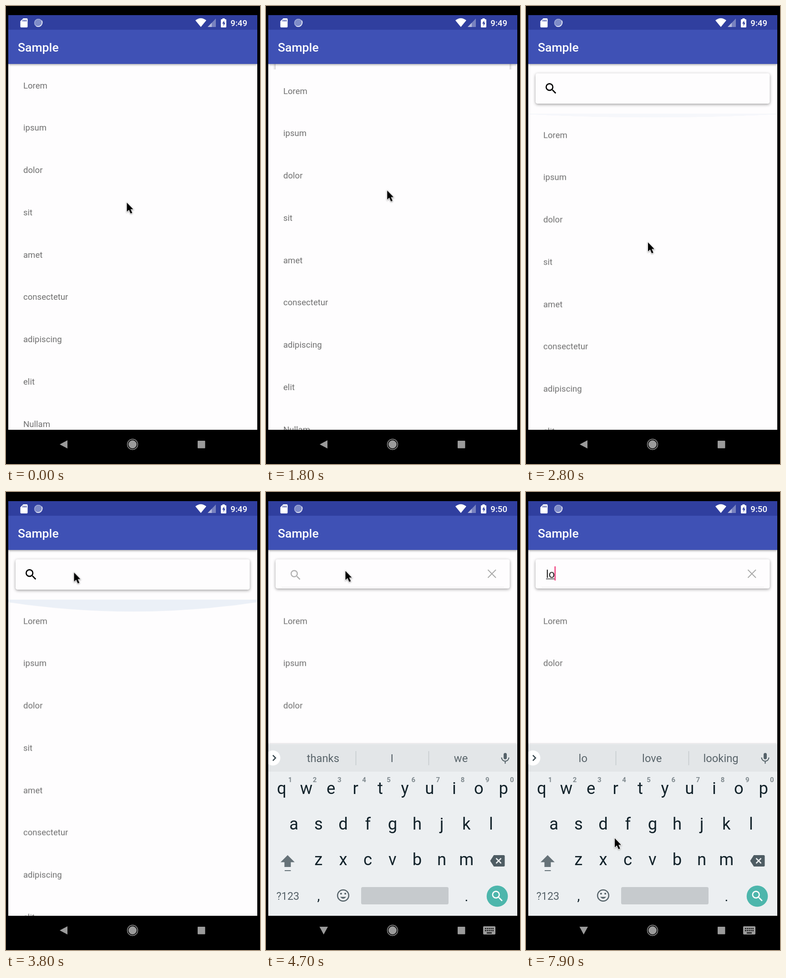
Write an HTML page that moves like this. It is 558x1004 px and loops after 8000 ms.

```html
<!DOCTYPE html>
<html lang="en">
<head>
<meta charset="utf-8">
<title>Pull-down search</title>
<style>
html, body { margin: 0; width: 100%; height: 100%; overflow: hidden; background: #000; }
svg { display: block; width: 100vw; height: 100vh; font-family: Roboto, sans-serif; }
.item { font-size: 18.6px; fill: #707070; }
.suggestion { font-size: 23.8px; fill: #59646a; text-anchor: middle; }
.key { font-size: 36.5px; fill: #13232b; text-anchor: middle; }
.digit { font-size: 15px; font-weight: 700; fill: #7f898e; text-anchor: middle; }
.typed { font-size: 23.8px; fill: #212121; }
.clock { font-size: 18.6px; font-weight: 500; fill: #fff; text-anchor: end; }
.card { fill: #fefdfe; filter: drop-shadow(0 2px 3px rgba(0, 0, 0, .38)); }
.bar { filter: drop-shadow(0 2px 2px rgba(0, 0, 0, .32)); }

/* Hard switches */
.pre-focus, .focused, .old-time, .new-time, .nav-idle, .nav-typing,
.empty, .filtered, .one, .two, .caret { animation: 8s step-end infinite; }
.pre-focus { animation-name: until-focus; }
.focused { animation-name: from-focus; }
.old-time { animation-name: until-minute; }
.new-time { animation-name: from-minute; }
.nav-idle { animation-name: until-keyboard; }
.nav-typing { animation-name: from-keyboard; }
.empty { animation-name: until-l; }
.filtered { animation-name: from-l; }
.one { animation-name: only-l; }
.two { animation-name: from-lo; }
.caret { animation-name: caret; }
@keyframes until-focus { 0% { opacity: 1 } 50%, 100% { opacity: 0 } }
@keyframes from-focus { 0% { opacity: 0 } 50%, 100% { opacity: 1 } }
@keyframes until-minute { 0% { opacity: 1 } 55%, 100% { opacity: 0 } }
@keyframes from-minute { 0% { opacity: 0 } 55%, 100% { opacity: 1 } }
@keyframes until-keyboard { 0% { opacity: 1 } 51.25%, 100% { opacity: 0 } }
@keyframes from-keyboard { 0% { opacity: 0 } 51.25%, 100% { opacity: 1 } }
@keyframes until-l { 0% { opacity: 1 } 65%, 100% { opacity: 0 } }
@keyframes from-l { 0% { opacity: 0 } 65%, 100% { opacity: 1 } }
@keyframes only-l { 0% { opacity: 0 } 65% { opacity: 1 } 68.75%, 100% { opacity: 0 } }
@keyframes from-lo { 0% { opacity: 0 } 68.75%, 100% { opacity: 1 } }
@keyframes caret {
  0% { opacity: 0; transform: none }
  51.25% { opacity: 1; transform: none }
  57.5% { opacity: 0; transform: none }
  63.75% { opacity: 1; transform: none }
  65% { opacity: 1; transform: translateX(6px) }
  68.75% { opacity: 1; transform: translateX(19.3px) }
  75% { opacity: 0; transform: translateX(19.3px) }
  81.25% { opacity: 1; transform: translateX(19.3px) }
  87.5% { opacity: 0; transform: translateX(19.3px) }
  93.75%, 100% { opacity: 1; transform: translateX(19.3px) }
}

/* Motion */
.panel { animation: pull 8s linear infinite; }
.search { animation: parallax 8s linear infinite; }
.glow { animation: glow 8s linear infinite; transform-origin: 278px 127px; }
.keyboard { animation: rise 8s linear infinite; }
.pointer { animation: point 8s ease-in-out infinite; }
.pointer path { animation: hide 8s step-end infinite; filter: drop-shadow(0 1px 1.5px rgba(0, 0, 0, .4)); }
@keyframes pull {
  0%, 21.25% { transform: none }
  27.5% { transform: translateY(59.7px) }
  32.5%, 100% { transform: translateY(108.5px) }
}
@keyframes parallax {
  0%, 21.25% { transform: translateY(-74.2px) }
  27.5% { transform: translateY(-33.5px) }
  32.5%, 100% { transform: none }
}
@keyframes glow {
  0%, 33% { opacity: 0; transform: scaleY(0) }
  40% { opacity: .6; transform: scaleY(1.15) }
  47.5% { opacity: .4; transform: none }
  51%, 100% { opacity: 0; transform: scaleY(.8) }
}
@keyframes rise {
  0%, 51.25% { transform: translateY(390px); animation-timing-function: ease-out }
  54%, 100% { transform: none }
}
@keyframes point {
  0%, 2.5% { transform: translate(265.5px, 431px) }
  12.5%, 15% { transform: translate(271.5px, 481px) }
  21.25% { transform: translate(266px, 392px); animation-timing-function: linear }
  27.5% { transform: translate(267px, 453.5px); animation-timing-function: linear }
  32.5% { transform: translate(268px, 502px); animation-timing-function: ease-out }
  40% { transform: translate(268px, 535px) }
  47.5%, 51% { transform: translate(149.5px, 176.5px) }
  56%, 92.5% { transform: translate(174.5px, 173px) }
  98%, 100% { transform: translate(195px, 759px) }
}
@keyframes hide { 0% { opacity: 1 } 65% { opacity: 0 } 92.5%, 100% { opacity: 1 } }
</style>
</head>
<body>
<svg viewBox="0 0 558 1004" preserveAspectRatio="none">
  <defs>
    <path id="lens" d="M15.5 14h-.79l-.28-.27A6.47 6.47 0 0 0 16 9.5 6.5 6.5 0 1 0 9.5 16c1.61 0 3.09-.59 4.23-1.57l.27.28v.79l5 4.99L20.49 19l-4.99-5zm-6 0a4.5 4.5 0 1 1 0-9 4.5 4.5 0 0 1 0 9z"/>
    <clipPath id="screen"><rect x="5" y="20" width="547" height="909"/></clipPath>
  </defs>
  <rect width="558" height="1004"/>

  <g clip-path="url(#screen)">
    <rect x="5" y="120" width="547" height="809" fill="#fefdfe"/>

    <g class="search">
      <g class="pre-focus">
        <rect class="card" x="21" y="147.5" width="514.5" height="66.5" rx="4.5"/>
        <use href="#lens" transform="translate(39 165) scale(1.33)"/>
      </g>
      <g class="focused">
        <rect class="card" x="21" y="147.5" width="514.5" height="64" rx="4.5"/>
        <path d="M34 208.5H523" stroke="#ececec"/>
        <path d="M487.5 170.5l17.5 17.5m0-17.5l-17.5 17.5" stroke="#a9a9a9" stroke-width="2"/>
        <use class="empty" href="#lens" transform="translate(50.3 167.3) scale(1.23)" fill="#b2b2b2"/>
      </g>
      <g class="one"><text class="typed" x="44" y="188">l</text><path d="M44 190.5h6" stroke="#333" stroke-width="1.5"/></g>
      <g class="two"><text class="typed" x="44" y="188">lo</text><path d="M44 190.5h19" stroke="#333" stroke-width="1.5"/></g>
      <rect class="caret" x="43.3" y="163" width="2.6" height="31" fill="#f0407f"/>
    </g>

    <g class="panel">
      <rect x="5" y="127" width="547" height="930" fill="#fefdfe"/>
      <path class="glow" d="M5 127H552V133Q278 174 5 133Z" fill="#cfdcec"/>
      <g id="all" class="empty"></g>
      <g id="matches" class="filtered"></g>
      <text class="item one" x="38" y="366">elit</text>
    </g>

    <g class="bar">
      <rect x="5" y="20" width="547" height="107" fill="#3f51b5"/>
      <rect x="5" y="20" width="547" height="32" fill="#303f9f"/>
    </g>
    <text x="26" y="100" font-size="26.6" font-weight="500" fill="#fff">Sample</text>

    <g fill="#fff">
      <path d="M38 27h7.500q2 0 2 2v16q0 2-2 2h-12q-2 0-2-2V33.500z"/>
      <path d="M37.500 30v4m3.300-4v4m3.300-4v4" stroke="#303f9f" stroke-width="1.600"/>
      <circle cx="71" cy="37" r="8.300" fill="#7e8bc8" stroke="#d5daf0" stroke-width="1.600" stroke-dasharray="1.500 1"/>
      <path d="M78.500 32a9 9 0 0 1-12 12" fill="none" stroke="#e4e7f5" stroke-width="1.800"/>
      <path d="M416 31.500Q428 22 440 31.500L428 46z"/>
      <path d="M443 46L461 27.500V46z" opacity=".35"/>
      <path d="M443 46L452 36.800V46z" opacity=".45"/>
      <path d="M475.500 29v-2h5v2h2q1.500 0 1.500 1.500v15q0 1.500-1.500 1.500h-9q-1.500 0-1.500-1.500v-15q0-1.500 1.500-1.500z"/>
      <path d="M479.500 31.500l-4.500 7h2.800v5.500l4-7.500h-2.600z" fill="#303f9f"/>
    </g>
    <text class="clock old-time" x="530" y="43.600">9:49</text>
    <text class="clock new-time" x="530" y="43.600">9:50</text>

    <g class="keyboard">
      <rect x="5" y="552" width="547" height="377" fill="#eceff1" style="filter:drop-shadow(0 -1px 1px rgba(0,0,0,.14))"/>
      <rect x="5" y="553" width="547" height="60" fill="#e3e6e8"/>
      <circle cx="15" cy="583" r="16.500" fill="#fff"/>
      <path d="M15 577l6 6-6 6" fill="none" stroke="#3a484f" stroke-width="2.500"/>
      <path d="M197.500 568v31m160-31v31" stroke="#c4c9cc" stroke-width="1.500"/>
      <g id="suggestions"></g>
      <g fill="none" stroke="#56636a" stroke-width="2.200">
        <rect x="522" y="572" width="7" height="14" rx="3.500" fill="#56636a" stroke="none"/>
        <path d="M517.500 582a8 8 0 0 0 16 0M525.500 590v5.500"/>
        <circle cx="169.500" cy="884.500" r="12.300" stroke-width="2.500"/>
        <path d="M163 887.500q6.500 8 13 0z" fill="#56636a" stroke="none"/>
      </g>
      <path d="M164.800 880.500h.1m9.200 0h.1" stroke="#56636a" stroke-width="4" stroke-linecap="round"/>
      <g id="keys"></g>
      <path d="M47.500 796L63 811.500h-8.500V822h-14v-10.500H32z" fill="#667278"/>
      <path d="M41 830h13.500" stroke="#667278" stroke-width="2"/>
      <path d="M500.500 796H522q2.500 0 2.500 2.500v20q0 2.500-2.500 2.500h-21.500L492.500 808.500z" fill="#4e5c63"/>
      <path d="M505.500 803l11 11m0-11l-11 11" stroke="#eceff1" stroke-width="2.500"/>
      <text x="48" y="893.500" font-size="23.400" fill="#566269" text-anchor="middle">?123</text>
      <text class="key" x="115.500" y="895" style="font-size:30px">,</text>
      <text class="key" x="440.500" y="897" style="font-size:30px">.</text>
      <rect x="209" y="866" width="192" height="38" rx="3.500" fill="#c6cacd"/>
      <circle cx="508" cy="886" r="23.300" fill="#4db6ac"/>
      <use href="#lens" transform="translate(492.500 870) scale(1.330)" fill="#fff"/>
    </g>
  </g>

  <g fill="#9b9b9b">
    <path class="nav-idle" d="M118 961L135 952V970z"/>
    <g class="nav-typing">
      <path d="M117.500 953H136L126.700 970z"/>
      <rect x="477" y="952" width="27" height="18" rx="2"/>
      <path d="M481 957h19m-19 4.500h19" stroke="#000" stroke-width="2.400" stroke-dasharray="2.400 1.700"/>
      <path d="M485 966.500h11" stroke="#000" stroke-width="2.200"/>
    </g>
    <circle cx="278" cy="961" r="9"/>
    <circle cx="278" cy="961" r="11.400" fill="none" stroke="#9b9b9b" stroke-width="1.500"/>
    <rect x="421" y="953" width="16.500" height="16.500" rx="1"/>
  </g>

  <g class="pointer">
    <path d="M0 0V20L4.600 15.800L8.300 24L11.800 22.400L8.200 14.400H14z" stroke="#fff" stroke-width="2" paint-order="stroke"/>
  </g>
</svg>
<script>
const addText = (parent, className, x, y, label) => {
  const text = document.createElementNS('http://www.w3.org/2000/svg', 'text');
  text.setAttribute('class', className);
  text.setAttribute('x', x);
  text.setAttribute('y', y);
  text.textContent = label;
  document.getElementById(parent).append(text);
};

const fillList = (parent, words) => words.split(' ').forEach((word, row) =>
  addText(parent, 'item', 38, 180.5 + row * 92.75, word));
fillList('all', 'Lorem ipsum dolor sit amet consectetur adipiscing elit Nullam');
fillList('matches', 'Lorem dolor');

const suggestions = { empty: 'thanks I we', one: 'l love like', two: 'lo love looking' };
for (const [state, words] of Object.entries(suggestions)) {
  words.split(' ').forEach((word, i) =>
    addText('suggestions', `suggestion ${state}`, 125.3 + i * 151.4, 592, word));
}

const keyStep = 54.15;
[['qwertyuiop', 34.3], ['asdfghjkl', 61.3], ['zxcvbnm', 115.3]].forEach(([letters, left], row) =>
  [...letters].forEach((letter, i) => {
    const x = left + i * keyStep;
    addText('keys', 'key', x, 662 + row * 78, letter);
    if (row === 0) addText('keys', 'digit', x + 18.7, 636, (i + 1) % 10);
  }));
</script>
</body>
</html>
```
